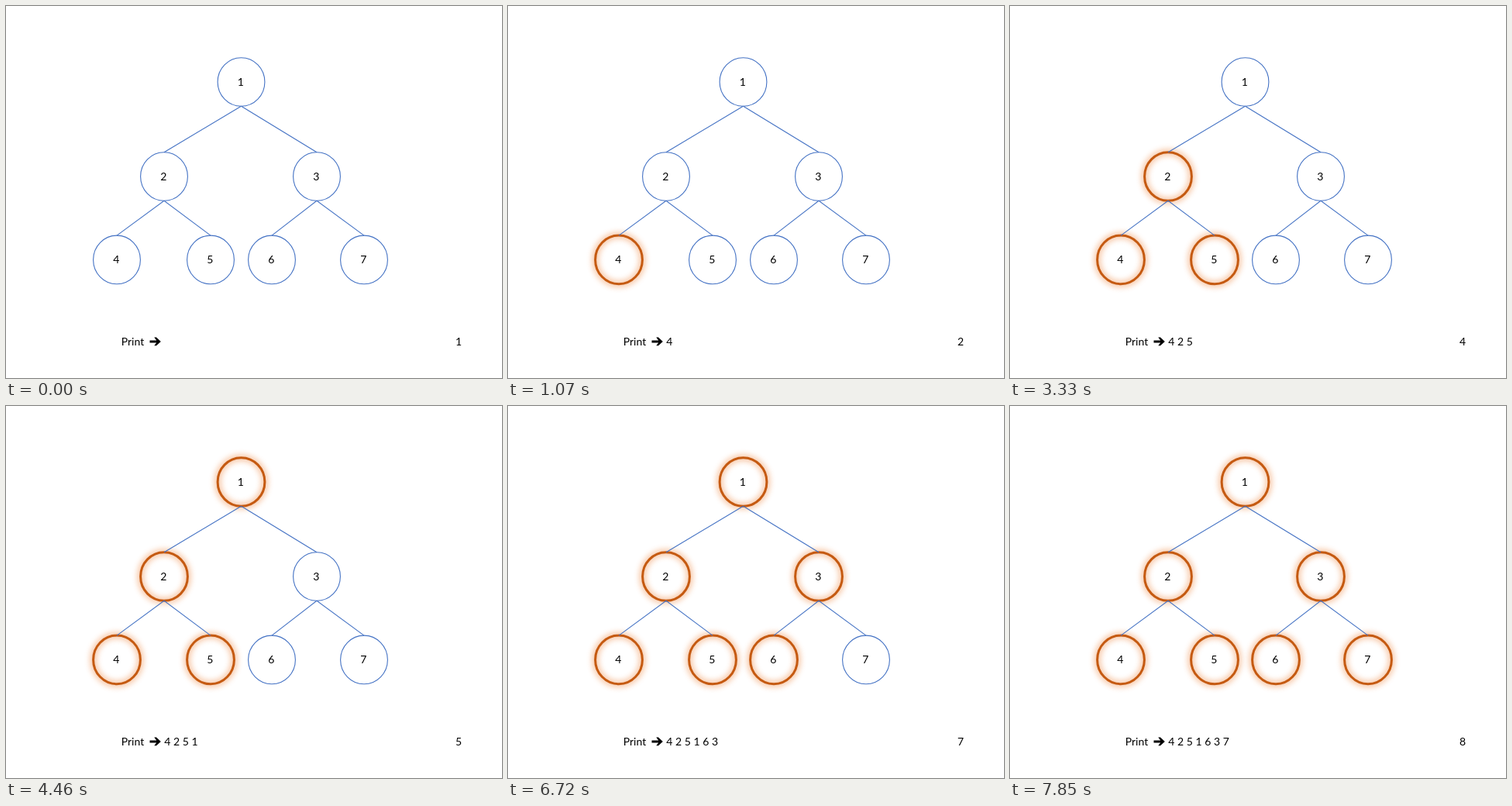
An HTML page that plays this animation: 640x480 px, repeating every 8.98 s.

```html
<!DOCTYPE html>
<html lang="en">
<head>
<meta charset="utf-8">
<title>In-order traversal</title>
<style>
  html, body { margin: 0; width: 100%; height: 100%; overflow: hidden; background: #fff; }
  svg { display: block; }
  text { font: 14px Lato, "Open Sans", sans-serif; fill: #000; text-anchor: middle; }
  .label { text-anchor: start; }
  .edge, .ring { fill: none; stroke: #4472c4; stroke-width: 1.1; }
  .glow { fill: none; stroke: #ed7d31; stroke-width: 9; opacity: .4; filter: url(#blur); visibility: hidden; }
  .visited .ring { stroke: #c55a11; stroke-width: 3; }
  .visited .glow { visibility: visible; }
  .output { visibility: hidden; }
  .output.visited { visibility: visible; }
</style>
</head>
<body>
<svg id="stage" width="640" height="480" viewBox="0 0 640 480">
  <defs>
    <filter id="blur" x="-40%" y="-40%" width="180%" height="180%">
      <feGaussianBlur stdDeviation="3.6"/>
    </filter>
  </defs>
  <g id="nodes"></g>
  <g id="edges"></g>
  <text class="label" x="148.7" y="438">Print</text>
  <path d="M185.5 431.4H194.2L191.2 427.6H194L199.8 432.9L194 438.2H191.2L194.2 434.4H185.5Z"/>
  <g id="outputs"></g>
  <text id="counter" x="584" y="438">1</text>
</svg>
<script>
const FIRST_HOLD = 1070, HOLD = 1130, LOOP = 8980;
const RX = 30.4, RY = 31.3;
const ORDER = [4, 2, 5, 1, 6, 3, 7];
const CENTERS = {
  1: [303.5, 98], 2: [204, 220], 3: [401, 220],
  4: [143, 327.4], 5: [264, 327.4], 6: [343, 327.4], 7: [462, 327.4]
};
const byId = id => document.getElementById(id);

function add(parent, tag, attributes, text = "") {
  const element = document.createElementNS(byId("stage").namespaceURI, tag);
  for (const name in attributes) element.setAttribute(name, attributes[name]);
  element.textContent = text;
  return parent.appendChild(element);
}

const nodes = {};
for (const [id, [cx, cy]] of Object.entries(CENTERS)) {
  const node = nodes[id] = add(byId("nodes"), "g", {});
  for (const name of ["glow", "ring"])
    add(node, "ellipse", { class: name, cx, cy, rx: RX, ry: RY });
  add(node, "text", { x: cx - 0.8, y: cy + 5 }, id);

  if (id > 1) {
    const [px, py] = CENTERS[Math.floor(id / 2)];
    add(byId("edges"), "line", { class: "edge", x1: px, y1: py + RY, x2: cx, y2: cy - RY });
  }
}

const outputs = ORDER.map((id, i) =>
  add(byId("outputs"), "text", { class: "output", x: 208.4 + 11.72 * i, y: 438 }, id));

function draw(now) {
  const time = now % LOOP;
  const step = Math.max(0, Math.floor((time - FIRST_HOLD) / HOLD) + 1);
  ORDER.forEach((id, i) => {
    nodes[id].classList.toggle("visited", i < step);
    outputs[i].classList.toggle("visited", i < step);
  });
  byId("counter").textContent = step + 1;
}

function tick() {
  draw(performance.now());
  requestAnimationFrame(tick);
}
tick();
</script>
</body>
</html>
```
